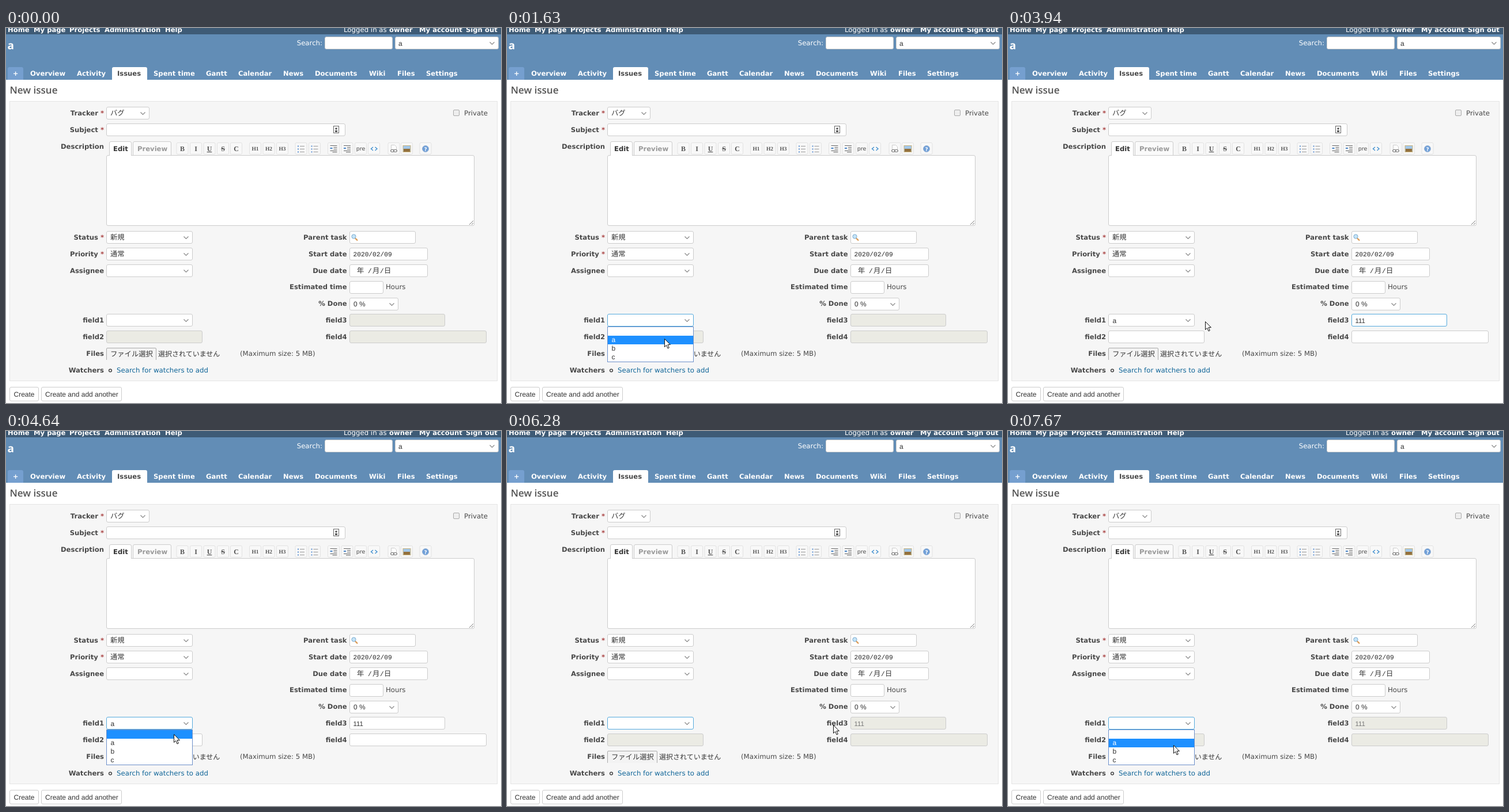
Write an HTML page that moves like this. It is 859 px wide and 652 px high and loops after 8000 ms.

```html
<!DOCTYPE html>
<html lang="en">
<head>
<meta charset="utf-8">
<title>New issue</title>
<style>
  html, body { margin: 0; width: 100%; height: 100%; overflow: hidden; background: #fff; }
  svg { display: block; text-rendering: geometricPrecision; }
  text { font: 11.75px "DejaVu Sans", sans-serif; fill: #484848; }
  .bold { font-size: 11.6px; font-weight: bold; }
  .white { fill: #fff; }
  .heading { font: 600 17px "Open Sans", sans-serif; fill: #555; }
  .project { font: bold 19px "Open Sans", sans-serif; fill: #fff; }
  .field { font: 12px "Liberation Sans", sans-serif; fill: #333; }
  .digits { font-size: 11.5px; }
  .cjk { font: 12.3px "Noto Sans CJK JP", "Noto Sans CJK", sans-serif; fill: #333; }
  .date { font: 11.2px "Liberation Mono", monospace; fill: #222; }
  .tool { font: bold 12px "Liberation Serif", serif; fill: #555; text-anchor: middle; }
  .small { font-size: 9.5px; }
  .end { text-anchor: end; }
  .mid { text-anchor: middle; }
</style>
</head>
<body>
<svg id="stage" width="859" height="652" viewBox="0 0 859 652"></svg>
<script>
const LOOP = 8000;
const stage = document.getElementById('stage');

const text = (x, y, str, cls = '', attrs = '') => `<text x="${x}" y="${y}" class="${cls}" ${attrs}>${str}</text>`;
const rect = (x, y, w, h, fill, attrs = '') => `<rect x="${x}" y="${y}" width="${w}" height="${h}" fill="${fill}" ${attrs}/>`;
const path = (d, stroke, width = 1, attrs = '') => `<path d="${d}" fill="none" stroke="${stroke}" stroke-width="${width}" ${attrs}/>`;
const box = (x, y, w, h = 21, attrs = '', fill = '#fff') =>
  rect(x + .5, y + .5, w, h, fill, `stroke="#ccc" rx="2.5" ${attrs}`);
const chevron = (x, y) => path(`M${x - 4} ${y - 2}l4 4 4-4`, '#888', 1.2);
const select = (x, y, w, id = '') => box(x, y, w, 21, id) + chevron(x + w - 10.5, y + 11.5);

function header() {
  const topLinks = [[3, 'Home'], [48, 'My page'], [110, 'Projects'], [171, 'Administration'],
    [276, 'Help'], [665, 'owner'], [717, 'My account'], [798, 'Sign out']];
  const tabs = [[42, 'Overview'], [123, 'Activity'], [193, 'Issues'], [256, 'Spent time'],
    [347, 'Gantt'], [403, 'Calendar'], [481, 'News'], [536, 'Documents'], [630, 'Wiki'],
    [679, 'Files'], [729, 'Settings']];
  return rect(0, 0, 859, 90, '#628db6') + rect(0, 0, 859, 11, '#3e5b76') +
    topLinks.map(([x, s]) => text(x, 7, s, 'bold white')).join('') +
    text(586, 7, 'Logged in as', 'white') +
    text(2.5, 37, 'a', 'project') +
    text(549, 30, 'Search:', 'white end') + box(553, 15, 117) + select(675, 15, 179) +
    text(681, 31, 'a', 'field') +
    path('M3 90V71q0-3 3-3H27q3 0 3 3V90z', 'none', 0, 'style="fill:#759fcf"') +
    path('M184 90V71q0-3 3-3H242q3 0 3 3V90z', 'none', 0, 'style="fill:#fff"') +
    text(16.5, 83, '+', 'bold white mid') +
    tabs.map(([x, s]) => text(x, 83, s, s === 'Issues' ? 'bold' : 'bold white')).join('');
}

function labels() {
  const star = '<tspan fill="#a44"> *</tspan>';
  const left = [[152, 'Tracker' + star], [181, 'Subject' + star], [210, 'Description'],
    [368, 'Status' + star], [397, 'Priority' + star], [426, 'Assignee'], [512, 'field1'],
    [541, 'field2'], [570, 'Files'], [599, 'Watchers']];
  const right = [[368, 'Parent task'], [397, 'Start date'], [426, 'Due date'],
    [454, 'Estimated time'], [483, '% Done'], [512, 'field3'], [541, 'field4']];
  return left.map(([y, s]) => text(170, y, s, 'bold end')).join('') +
    right.map(([y, s]) => text(591.5, y, s, 'bold end')).join('');
}

function toolbar() {
  const centers = [306, 329.5, 353, 376.5, 399.5, 432.5, 456, 479.5, 512, 535.5,
    568.5, 592, 615.5, 638.5, 673, 695.5, 728];
  const frames = centers.map(x => rect(x - 10, 199.5, 20, 20, '#f8f8f8', 'stroke="#e2e2e2" rx="2"')).join('');
  const styles = ['', 'font-style="italic"', 'text-decoration="underline"', 'text-decoration="line-through"', ''];
  const letters = [...'BIUSC'].map((s, i) => text(centers[i], 214, s, 'tool', styles[i])).join('');
  const heads = [1, 2, 3].map(n => text(centers[n + 4], 213, 'H' + n, 'tool small')).join('');
  const list = x => [205.5, 210.5, 215.5].map(y =>
    path(`M${x - 6} ${y}h2`, '#5b8fd0', 2) + path(`M${x - 2} ${y}h8`, '#999')).join('');
  const indent = x => path(`M${x - 6} 204.5h12M${x} 207.5h6M${x} 210.5h6M${x - 6} 213.5h12M${x - 2} 216h8`, '#666') +
    path(`M${x - 6} 209h4`, '#4a86c8', 2);
  return path('M179.5 222V200q0-2.5 2.5-2.5H215q2.5 0 2.5 2.5V222', '#ccc', 1, 'style="fill:#fff"') +
    path('M220.5 221V200q0-2.5 2.5-2.5H284q2.5 0 2.5 2.5V221', '#ccc', 1, 'style="fill:#fafafa"') +
    text(186, 214, 'Edit', 'bold', 'style="fill:#333"') +
    text(228, 214, 'Preview', 'bold', 'style="fill:#999"') +
    frames + letters + heads + list(512) + list(535.5) + indent(568.5) + indent(592) +
    text(615.5, 213, 'pre', 'mid', 'style="font-size:9.5px"') +
    path('M637 207l-3.5 3 3.5 3M640.5 207l3.5 3-3.5 3', '#3f8fd0', 1.4) +
    path('M668.5 215V203.5h6l3 3V215', '#ccc', 1, 'style="fill:#fff"') +
    rect(667.5, 211.5, 6, 4, 'none', 'stroke="#666" rx="2"') + rect(672.5, 211.5, 6, 4, 'none', 'stroke="#666" rx="2"') +
    rect(689, 204.5, 13, 11, '#a3c8ea', 'stroke="#c8b27c"') + rect(690, 210, 11, 5, '#93703c') +
    '<circle cx="728" cy="210" r="5.5" fill="#6f9fd8" stroke="#9ab4d4"/>' +
    text(728, 213.5, '?', 'bold white mid', 'style="font-size:9px"');
}

function form() {
  return rect(6.5, 127.5, 846, 486, '#f6f6f6', 'stroke="#e4e4e4"') + labels() +
    select(174, 137, 74) + text(181, 152, 'バグ', 'cjk') +
    rect(776.5, 142.5, 10, 10, '#eee', 'stroke="#aaa" rx="1.5"') + text(795, 152, 'Private') +
    box(174, 166, 414) +
    rect(568.5, 170.5, 9, 12, '#fff', 'stroke="#666"') + rect(571, 178, 4, 3, '#555') +
    '<circle cx="573" cy="175" r="1.8" fill="#555"/>' +
    box(174, 221, 638, 122, 'rx="0"') + toolbar() + path('M180 221.5h37', '#fff') +
    path('M804 342l7-7M808 342l3-3', '#777') +
    select(174, 353, 149) + text(181, 368, '新規', 'cjk') +
    select(174, 382, 149) + text(181, 397, '通常', 'cjk') + select(174, 411, 149) +
    box(596, 353, 114) + path('M606 365.5l4 4', '#d9954c', 2.2) +
    '<circle cx="603.5" cy="362.5" r="3.6" fill="#c5e4f7" stroke="#78a9cf"/>' +
    box(596, 382, 135) + text(602.5, 397, '2020/02/09', 'date') +
    box(596, 411, 135) +
    [[609, '年'], [628, '/'], [636, '月'], [649, '/'], [656, '日']]
      .map(([x, s]) => text(x, 426, s, s === '/' ? 'date' : 'cjk')).join('') +
    box(596, 440, 58) + text(659, 454, 'Hours') +
    select(596, 469, 84) + text(603, 484, '0 %', 'field') +
    select(174, 497, 149, 'id="field1"') + text(181.5, 512.5, '', 'field', 'id="value1"') +
    box(174, 526, 166, 21, 'id="field2"') +
    box(596, 497, 165, 21, 'id="field3"') + text(602.5, 512.5, '', 'field digits', 'id="value3"') +
    box(596, 526, 237, 21, 'id="field4"') +
    path('M174.5 577V558q0-1.5 1.5-1.5H259q1.5 0 1.5 1.5V577', '#aaa', 1, 'style="fill:#f3f3f3"') +
    text(181, 571, 'ファイル選択', 'cjk') + text(264, 571, '選択されていません', 'cjk', 'style="font-size:12px"') +
    text(406, 569.5, '(Maximum size: 5 MB)') +
    '<circle cx="181" cy="595.5" r="2.4" fill="#fff" stroke="#333" stroke-width="1.3"/>' +
    text(192, 599, 'Search for watchers to add', '', 'style="fill:#169"') +
    box(6, 624, 50, 24) + text(13.5, 640.5, 'Create', 'field') +
    box(61, 624, 139, 24) + text(68, 640.5, 'Create and add another', 'field');
}

const options = ['', 'a', 'b', 'c'];
const popup = `<g id="popup">${rect(174.5, 519.5, 149, 61, '#fff', 'stroke="#6c8fc9"')}
  ${rect(175, 520, 148, 15, '#1e90ff', 'id="highlight"')}
  ${options.map((s, i) => text(181.5, 531 + i * 15, s, 'field option')).join('')}</g>`;

const pointers = `<circle id="halo" r="11" fill="#ff0" opacity=".65"/>
  <g id="arrow"><path d="M.5.5V14.5L3.7 11.5 6 17 8.3 16 6 10.6H10.4z" fill="#fff" stroke="#111"/></g>
  <g id="ibeam">${path('M-3.5-7.5h2.5l1 1 1-1h2.5M-3.5 7.5h2.5l1-1 1 1h2.5M0-7V7', '#111')}</g>
  <g id="forbidden"><circle r="6.3" fill="#fff" stroke="#c00d18" stroke-width="2"/>${path('M-4.4-4.4l8.8 8.8', '#c00d18', 2)}</g>`;

stage.innerHTML = rect(0, 0, 859, 652, '#fff') + header() + text(6.5, 114, 'New issue', 'heading') +
  form() + popup + pointers;

const part = {};
stage.querySelectorAll('[id]').forEach(el => part[el.id] = el);
const optionTexts = stage.querySelectorAll('.option');

// Pointer moves: start, end, number of steps, destination
const entry = [690, 655];
const moves = [
  [230, 760, 8, 299, 511],
  [1250, 1630, 6, 273, 540],
  [2090, 2230, 3, 586, 534],
  [2320, 2600, 4, 675, 507],
  [3650, 3940, 5, 342, 510],
  [4010, 4110, 2, 317, 512],
  [4430, 4810, 6, 285, 531],
  [5360, 5880, 8, 628, 506],
  [6280, 6280, 1, 566, 511],
  [6350, 6660, 5, 310, 510],
  [7300, 7670, 6, 287, 546],
];
const clicks = [[930, 1070], [1770, 1940], [2640, 2790], [4260, 4430], [5040, 5180], [6970, 7130]];
const opened = [[1000, 1940], [4260, 5180], [6970, LOOP]];
const during = (t, spans) => spans.some(([a, b]) => t >= a && t < b);

function pointerAt(t) {
  let [x, y] = entry;
  for (const [start, end, steps, toX, toY] of moves) {
    if (t < start) break;
    const step = Math.min(steps - 1, Math.floor((t - start) / (end - start || 1) * (steps - 1) + .3));
    const progress = 1 - (1 - (step + 1) / steps) ** 1.5;
    x += (toX - x) * progress;
    y += (toY - y) * progress;
  }
  return [Math.round(x), Math.round(y)];
}

const show = (el, on) => el.style.display = on ? '' : 'none';
const inside = (x, y, left, top, right) => x >= left && x <= right && y >= top && y <= top + 21;

function render(t) {
  const [x, y] = pointerAt(t);
  const enabled = t >= 1940 && t < 5180;
  const open = during(t, opened);
  const focus3 = t >= 2640 && t < 4260;
  const focus1 = t >= 930 && !focus3;

  part.value1.textContent = enabled ? 'a' : '';
  part.value3.textContent = '1'.repeat([2950, 3100, 3410].filter(at => t >= at).length);
  part.value3.style.fill = enabled ? '#333' : '#777';
  for (const id of ['field2', 'field3', 'field4']) part[id].setAttribute('fill', enabled ? '#fff' : '#ebebe4');
  part.field1.setAttribute('stroke', focus1 ? '#5ad' : '#ccc');
  part.field3.setAttribute('stroke', focus3 ? '#5ad' : '#ccc');

  show(part.popup, open);
  const row = y >= 520 ? Math.floor((y - 520) / 15) : enabled ? 1 : 0;
  part.highlight.setAttribute('y', 520 + row * 15);
  optionTexts.forEach((el, i) => el.style.fill = i === row ? '#fff' : '#333');

  const overInput = !open && (inside(x, y, 174, 526, 340) || inside(x, y, 596, 497, 762) || inside(x, y, 596, 526, 833));
  const shape = overInput ? (enabled ? 'ibeam' : 'forbidden') : 'arrow';
  const visible = t >= 230 && !(t >= 2950 && t < 3650);
  for (const id of ['halo', 'arrow', 'ibeam', 'forbidden']) {
    part[id].setAttribute('transform', `translate(${x} ${y})`);
    show(part[id], id === 'halo' ? during(t, clicks) : visible && id === shape);
  }
}

function tick() {
  render(performance.now() % LOOP);
  requestAnimationFrame(tick);
}
tick();
</script>
</body>
</html>
```
